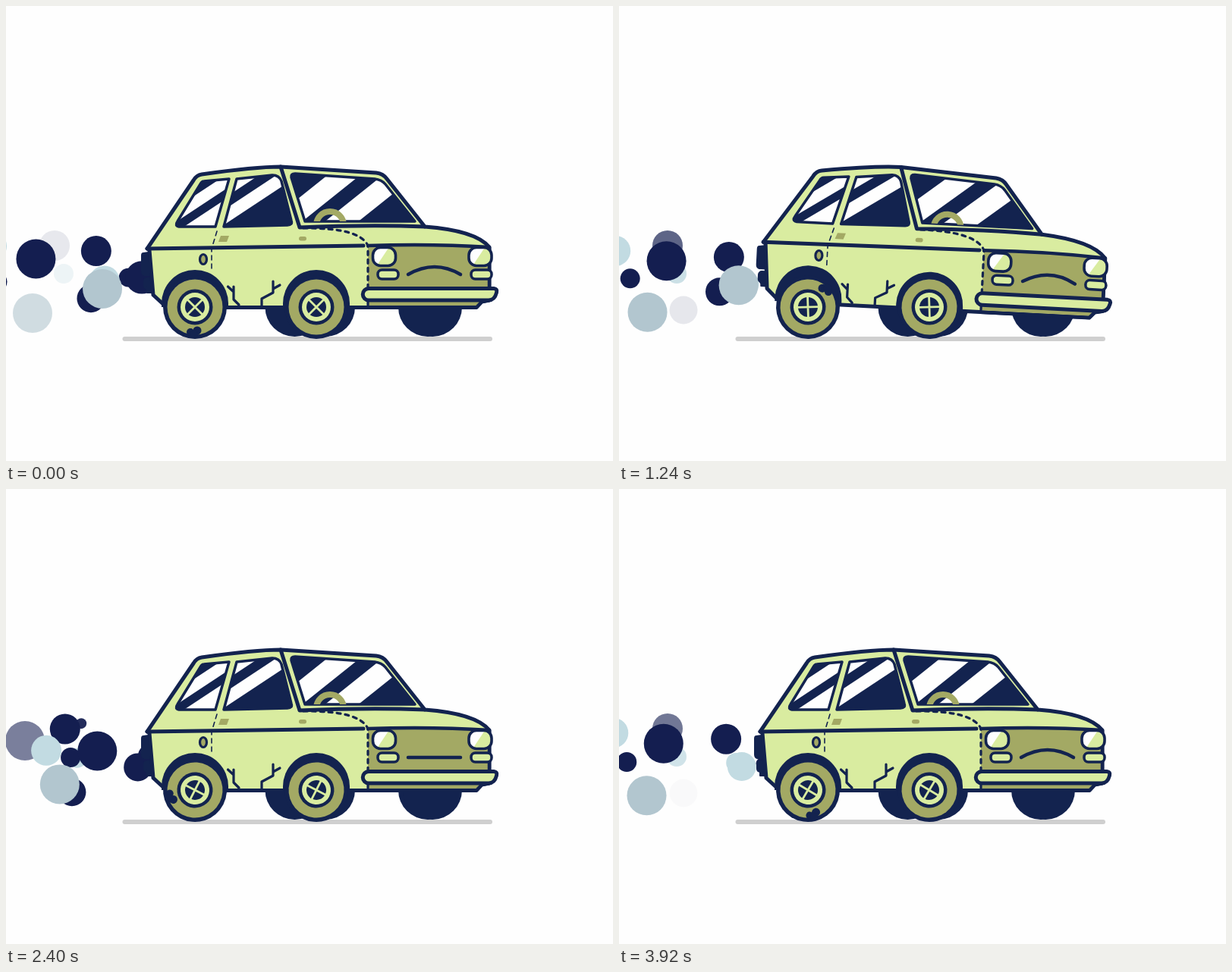
Animation, 800 px wide and 600 px high, one loop 3.96 s. Source, as an HTML page with a canvas:

```html
<!DOCTYPE html>
<html lang="en">
<head>
<meta charset="utf-8">
<title>Old car</title>
<style>
  html, body { margin: 0; width: 100%; height: 100%; overflow: hidden; background: #fefefe; }
  canvas { display: block; }
</style>
</head>
<body>
<canvas id="stage" width="800" height="600"></canvas>
<script>
const ctx = document.getElementById('stage').getContext('2d');
const NAVY = '#13234f', LIME = '#d9eca0', OLIVE = '#a3a964', WHITE = '#fefefe';
const SOOT = '#141e50', STEEL = '#b2c6cf', MIST = '#c2dbe2';

// Times below are counted in steps of 40 ms.
const LOOP = 3960, STEP = 40;
const PUFF_PERIOD = 100 / 9, PUFF_TRAVEL = 20, PUFF_FADE = 4;
const ROCK_PERIOD = 20, WHEEL_TURN = 50;
const EXHAUST = { x: 214, y: 367 };

const clamp = u => Math.max(0, Math.min(1, u));
const smooth = u => u * u * (3 - 2 * u);
const ramp = (n, from, to) => smooth(clamp((n - from) / (to - from)));
const mix = (a, b, u) => a + (b - a) * u;

function disc(x, y, r, color) {
  ctx.fillStyle = color;
  ctx.beginPath();
  ctx.arc(x, y, r, 0, 7);
  ctx.fill();
}

function shape(d, fill, width, stroke = NAVY) {
  const path = new Path2D(d);
  if (fill) { ctx.fillStyle = fill; ctx.fill(path); }
  if (width) { ctx.strokeStyle = stroke; ctx.lineWidth = width; ctx.stroke(path); }
}

function roundBox(x, y, w, h, r, fill, width) {
  ctx.beginPath();
  ctx.roundRect(x, y, w, h, r);
  ctx.fillStyle = fill;
  ctx.fill();
  if (width) { ctx.strokeStyle = NAVY; ctx.lineWidth = width; ctx.stroke(); }
}

// Every puff eases from the exhaust to its end point on a bowed path, then fades.
const puff = (color, r, delay, x, y, bow = -50) => ({ color, r, delay, x, y, bow });
const lastPuffs = new Set();
const puffs = [
  puff(SOOT, 7, -4, 99, 309, 50),
  puff(MIST, 13, 0, 76, 353, 0),
  puff(SOOT, 20, -0.7, 64, 316),
  puff(SOOT, 18.5, -3, 85, 401),
  puff(SOOT, 13, 5, -24, 366),
  puff(SOOT, 26, -5.5, 25, 332, -17),
  puff(MIST, 20, 3, -20, 316, 60),
  puff(STEEL, 26, 1.3, 35, 405)
];
// The low puffs are not released again just before the loop ends.
const isLow = p => p.y > 400;
const lastCycle = Math.floor(LOOP / STEP / PUFF_PERIOD);

function drawPuff(p, age) {
  const u = age / PUFF_TRAVEL, s = smooth(clamp(u));
  const fade = (age - PUFF_TRAVEL + 0.7) / PUFF_FADE;
  if (u <= 0 || fade >= 1) return;
  ctx.globalAlpha = 1 - clamp(fade);
  disc(mix(EXHAUST.x, p.x, s), mix(EXHAUST.y, p.y, s) + p.bow * s * (1 - s),
    p.r * clamp((u - 0.05) / 0.27), p.color);
}

function drawSmoke(n) {
  const cycle = Math.floor(n / PUFF_PERIOD);
  for (const p of puffs) {
    for (let c = cycle - 2; c <= cycle + 1; c++) {
      if (c === lastCycle && isLow(p)) continue;
      drawPuff(p, n - c * PUFF_PERIOD - p.delay);
    }
  }
  ctx.globalAlpha = 1;
}

// Pitch of the body within one rocking cycle, in radians.
function pitch(n) {
  const q = n % ROCK_PERIOD;
  const low = -0.036, high = 0.052;
  if (q < 2) return low * (1 - Math.pow(1 - q / 2, 4));
  if (q < 12) return mix(low, high, ramp(q, 2, 8));
  return high * (1 - ramp(q, 12, 17.5));
}

// White reflections lie between slanted lines, given by their x at y = 230.
function glass(d, slope, bands) {
  const path = new Path2D(d);
  ctx.save();
  ctx.fillStyle = NAVY;
  ctx.fill(path);
  ctx.clip(path);
  ctx.fillStyle = WHITE;
  const up = 20 / slope, down = 80 / slope;
  for (const [from, to] of bands) {
    ctx.beginPath();
    ctx.moveTo(from + up, 210);
    ctx.lineTo(to + up, 210);
    ctx.lineTo(to - down, 310);
    ctx.lineTo(from - down, 310);
    ctx.fill();
  }
  ctx.restore();
  shape(d, null, 3.5);
}

function drawWindows() {
  glass('M261 231 L294 228 L276 291 L228 291 Q222 290 226 284 L256 235 Q258 231 261 231 Z',
    0.66, [[279, 307], [327, 420]]);
  glass('M304 228 L351 223 Q360 223 363 231 L376 283 Q378 289 371 289 L287 291 Z',
    0.66, [[230, 323], [346, 376]]);
  const screen = 'M381 221 L486 228 Q495 229 500 235 L539 284 L394 284 L376 226 Q375 221 381 221 Z';
  glass(screen, 0.8, [[415, 458], [488, 532]]);
  ctx.save();
  ctx.clip(new Path2D(screen));
  ctx.beginPath();
  ctx.arc(427, 289, 18, Math.PI, 0);
  ctx.strokeStyle = OLIVE;
  ctx.lineWidth = 8;
  ctx.stroke();
  ctx.restore();
}

function headlight(x, open) {
  const h = 24 * open, top = 330.5 - h / 2, r = Math.min(10, h / 2);
  const lit = open > 0.3;
  ctx.save();
  roundBox(x, top, 30, h, r, lit ? LIME : NAVY);
  ctx.clip();
  if (lit) shape(`M${x} ${top} H${x + 21} L${x + 5} ${top + h} H${x} Z`, WHITE);
  ctx.restore();
  ctx.beginPath();
  ctx.roundRect(x, top, 30, h, r);
  ctx.strokeStyle = NAVY;
  ctx.lineWidth = 3.6;
  ctx.stroke();
}

function drawFace(n) {
  const smile = ramp(n, 37, 43) - ramp(n, 57, 63);
  const wink = ramp(n, 42, 46) - ramp(n, 52, 56);
  headlight(483.5, mix(1, 0.22, wink));
  headlight(610, 1);
  for (const x of [490, 613]) roundBox(x, 348, 27, 12, 5.5, LIME, 3.5);
  shape(`M530 354 Q565 ${mix(334, 374, smile)} 599 354`, null, 4.5);
}

function drawArch(x) {
  shape(`M${x - 44} 397 V392 A44 44 0 0 1 ${x + 44} 392 V397 Z`, NAVY);
}

function drawBody(n) {
  const angle = pitch(n);
  const sink = angle > 0 ? 51 * angle : -70 * angle;
  ctx.save();
  ctx.translate(409, 396 + sink);
  ctx.rotate(angle);
  ctx.translate(-409, -396);

  shape('M181 325 L188 324 L191 356 L182 356 Q178 355 178 350 L178 329 Q178 325 181 325 Z', NAVY);
  roundBox(181, 358, 15, 16, 5, NAVY);
  roundBox(185, 370, 10, 9, 1, NAVY);
  shape('M186 320 L247 230 Q251 223 258 222 Q328 212 362 212 L488 220 Q497 221 502 228 ' +
    'L552 291 Q619 296 637 318 L637 388 L627 390 L620 397.5 L230 397.5 L207 393 L194 381 L189 322 Z', LIME, 5);
  shape('M477 316 Q560 313 637 318 L637 388 L627 390 L621 395 H477 Z', OLIVE);
  shape('M477 316 Q560 313 637 318 L637 388 L627 390 L620 397.5 H477', null, 4.5);

  drawWindows();
  shape('M362 212 L387 292 Q480 288 552 291', null, 5);
  shape('M186 320 L471 316', null, 5);

  ctx.setLineDash([5, 6]);
  shape('M392 293 Q466 292 477 316 V395', null, 3.2);
  ctx.setLineDash([6, 5]);
  shape('M278 297 L271 320 V348', null, 1.6);
  ctx.setLineDash([]);

  shape('M283 303 H294 L291 311 H280 Z', OLIVE);
  roundBox(386, 304, 10, 5.5, 2.7, OLIVE);
  shape('M255.5 334 a4.5 6.5 0 0 1 9 0 a4.5 6.5 0 0 1 -9 0 Z', OLIVE, 3.2);
  shape('M292.5 370 L300 377 M300 370 V387 L307 394', null, 3.2);
  shape('M337 396 V386 L352 378 V363 M352 373 L361 368', null, 3.2);

  drawFace(n);
  shape('M478 372.5 H643 Q648 373 646.5 378 Q644 388 636 388 H478 A7.75 7.75 0 0 1 478 372.5 Z', LIME, 5);

  drawArch(249);
  drawArch(409);
  ctx.restore();
}

function drawWheel(x, n, scuffed) {
  ctx.save();
  ctx.translate(x, 397);
  ctx.rotate(n / WHEEL_TURN * 2 * Math.PI);
  disc(0, 0, 42, NAVY);
  disc(0, 0, 36.5, OLIVE);
  disc(0, 0, 23.5, NAVY);
  disc(0, 0, 19, LIME);
  disc(0, 0, 13, NAVY);
  shape('M-10 -10 L10 10 M10 -10 L-10 10', null, 2.8, LIME);
  if (scuffed) {
    disc(-6, 33, 5, NAVY);
    disc(3, 31, 5.5, NAVY);
    disc(-1, 36, 5, NAVY);
  }
  ctx.restore();
}

function draw(now) {
  const n = Math.floor((now % LOOP) / STEP);
  ctx.fillStyle = WHITE;
  ctx.fillRect(0, 0, 800, 600);
  ctx.lineCap = ctx.lineJoin = 'round';
  shape('M156.5 439 H638', null, 6, '#cfcfcf');
  drawSmoke(n);
  for (const x of [380.5, 421, 556, 562]) disc(x, 397, 39, NAVY);
  drawBody(n);
  drawWheel(249, n, true);
  drawWheel(409, n, false);
  requestAnimationFrame(draw);
}
requestAnimationFrame(draw);
</script>
</body>
</html>
```
